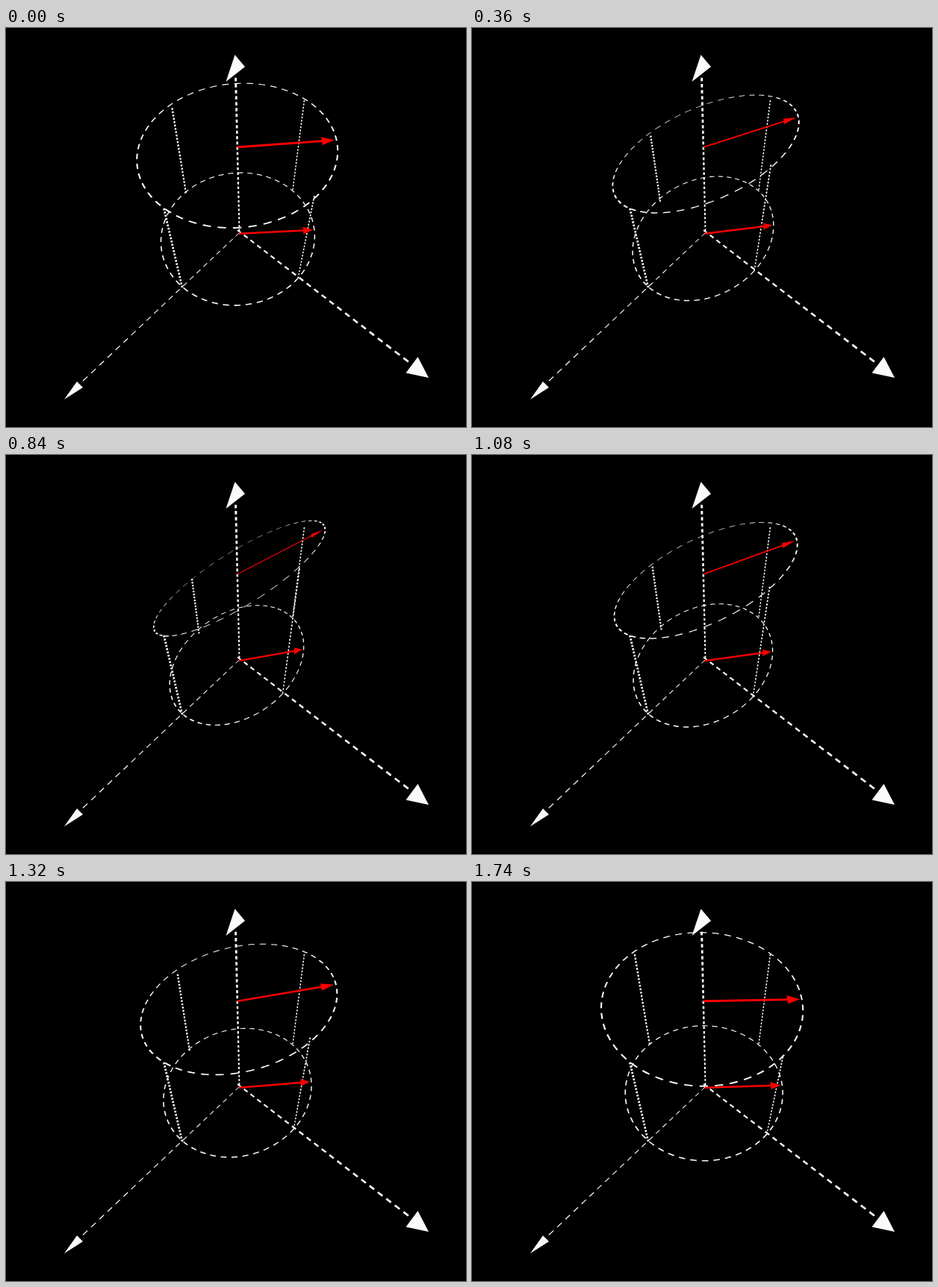
These frames come from a looping animation (616x535 px, 1.8 s). An HTML page with a canvas:

```html
<!DOCTYPE html>
<html lang="en">
<head>
<meta charset="utf-8">
<title>Tilting disc and its projection</title>
<style>
  html, body { margin: 0; width: 100%; height: 100%; overflow: hidden; background: #000; }
  canvas { display: block; }
</style>
</head>
<body>
<canvas id="stage" width="616" height="535"></canvas>
<script>
const ctx = document.getElementById('stage').getContext('2d');
const STEP = 60, STEPS = 30;
const WHITE = '#fafafa', RED = '#f00';
const DASHES = 46;
const RAD = Math.PI / 180;
const RADIUS = 0.55; // disc radius measured in cylinder heights

// Perspective projection; x and y in disc radii, z in cylinder heights.
function project(x, y, z) {
  const d = 1 - 0.07 * x - 0.045 * y - 0.215 * z;
  return [
    312 + (-69.2 * x + 79.5 * y - 1.6 * z) / d,
    275.8 + (67.4 * x + 59.9 * y - 91.1 * z) / d
  ];
}

function fill(points, color) {
  ctx.fillStyle = color;
  ctx.beginPath();
  points.forEach(p => ctx.lineTo(...p));
  ctx.closePath();
  ctx.fill();
}

const mix = (a, b, t) => a + (b - a) * t;
const between = (p, q, t) => [mix(p[0], q[0], t), mix(p[1], q[1], t)];

// Dashed line whose width and dash length grow towards q.
function dashLine(p, q, n, w0, w1, grow = 0) {
  const at = t => between(p, q, t + grow * (t * t - t));
  ctx.strokeStyle = WHITE;
  for (let i = 0; i < n; i++) {
    ctx.lineWidth = mix(w0, w1, i / n);
    ctx.beginPath();
    ctx.moveTo(...at(i / n));
    ctx.lineTo(...at((i + 0.56) / n));
    ctx.stroke();
  }
}

// Flat dashed ring lying in the plane of its disc.
function ring(disc) {
  const half = 0.0075, pitch = 360 / DASHES, parts = 5;
  for (let i = 0; i < DASHES; i++) {
    const outer = [], inner = [];
    for (let j = 0; j <= parts; j++) {
      const a = (i + 0.55 * j / parts) * pitch * RAD;
      const c = Math.cos(a), s = Math.sin(a);
      outer.push(disc(c * (1 + half), s * (1 + half)));
      inner.unshift(disc(c * (1 - half), s * (1 - half)));
    }
    fill(outer.concat(inner), WHITE);
  }
}

// Flat arrow from the centre of a disc towards its rim.
function arrow(disc) {
  const ux = Math.cos(133.6 * RAD), uy = Math.sin(133.6 * RAD);
  const shaft = 0.0145, head = 0.057, neck = 0.85, tip = 0.98;
  const side = [[0, shaft], [neck, shaft], [neck, head], [tip, 0]];
  const mirror = side.map(([r, w]) => [r, -w]).reverse();
  fill(side.concat(mirror).map(([r, w]) => disc(r * ux - w * uy, r * uy + w * ux)), RED);
}

function axes() {
  dashLine([312.5, 272], [307.5, 63], 31, 1.8, 3, 0.25);
  dashLine([310, 271], [544, 451.5], 23, 2, 2.8, 0.16);
  dashLine([312, 275], [98, 478], 22, 1, 1.3, 0.16);
  fill([[306.5, 36], [320, 52], [294.5, 72]], WHITE);
  fill([[551.5, 441], [566, 469], [535.5, 462.5]], WHITE);
  fill([[95, 474], [103, 482], [78, 498]], WHITE);
}

function draw(n) {
  const v = (1 + Math.cos((n - 12.42) * 10.9 * RAD)) / 2;
  const tilt = mix(0.9, 46, v) * RAD;
  const shrink = mix(0.006, 0.294, v);
  const lift = shrink * (0.95 + 1.45 * shrink);
  const cos = Math.cos(tilt), sin = Math.sin(tilt);
  const top = (x, y) => project(x, y * cos, 1 + RADIUS * sin * y);
  const base = (x, y) => project(x, y * (1 - shrink), 0);

  ctx.fillStyle = '#000';
  ctx.fillRect(0, 0, 616, 535);
  axes();
  ring(base);
  ring(top);

  // Four edges of the cylinder: two fixed, two following the tilt.
  dashLine([236, 348], [211, 240], 25, 2.6, 2.8);
  dashLine([384, 217], [399.7, 95], 28, 1.4, 1.6);
  dashLine(between([238, 218], [259, 240], v), between([217.5, 95], [249.5, 166], v),
    Math.round(mix(27, 19, v)), 2.1, 2.4);
  dashLine(base(0, 1), project(0, 1 - shrink, 1 + lift),
    Math.round(mix(25, 36, v)), 1.4, 1.8);

  arrow(base);
  arrow(top);
}

function tick(now) {
  draw(Math.floor(now / STEP) % STEPS);
  requestAnimationFrame(tick);
}
draw(0);
requestAnimationFrame(tick);
</script>
</body>
</html>
```
